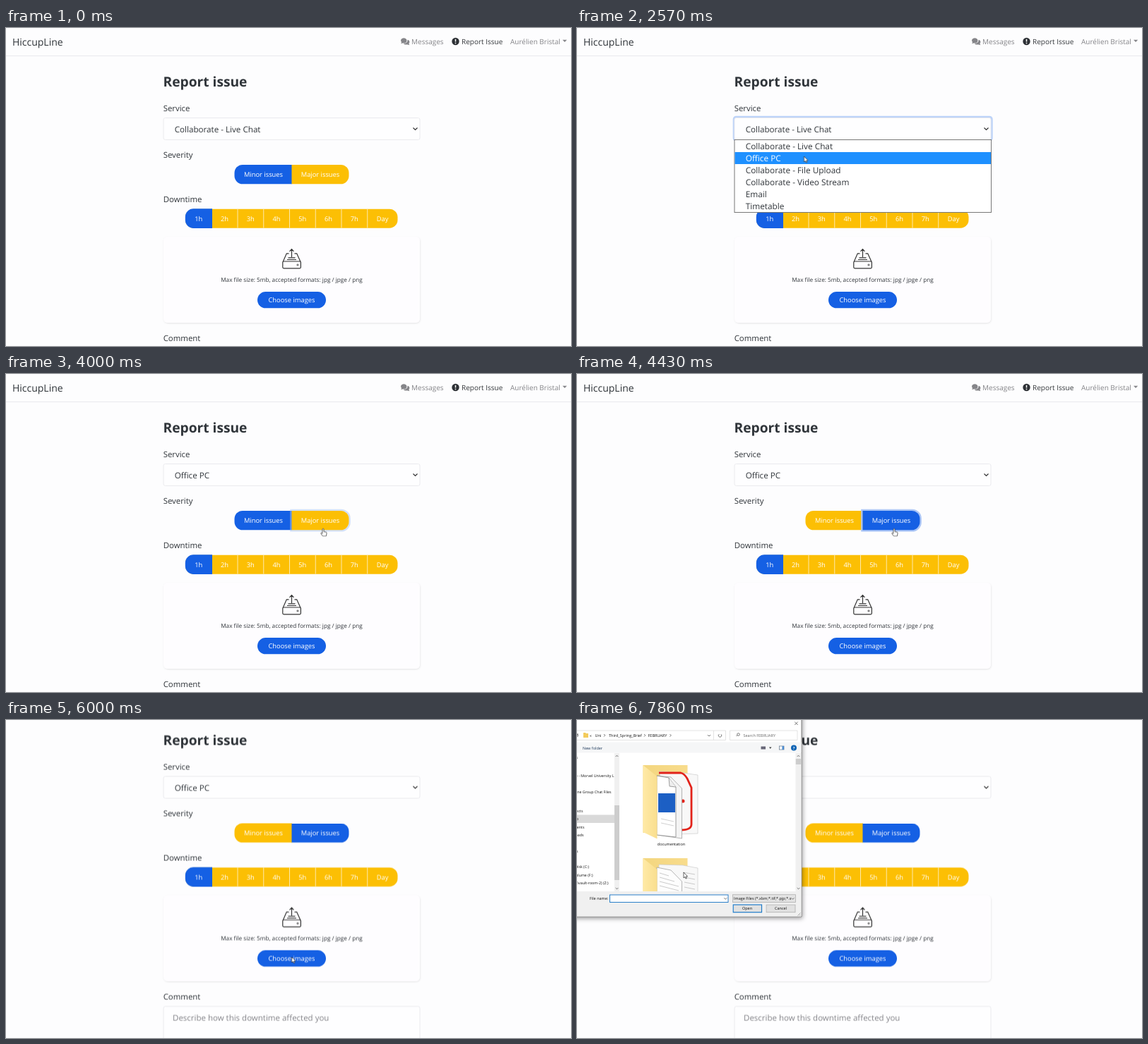
An HTML page that plays this animation: 800 px wide and 451 px high, repeating every 8000 ms.

```html
<!DOCTYPE html>
<html lang="en">
<head>
<meta charset="utf-8">
<title>Report issue</title>
<style>
html, body { margin: 0; width: 100%; height: 100%; overflow: hidden; background: #fdfdfe; }
svg { display: block; width: 100vw; height: 100vh; }
text { font-family: "Open Sans", "Noto Sans", sans-serif; fill: #30353a; text-rendering: geometricPrecision; font-variant-ligatures: none; white-space: pre; }
.label { font-size: 11.4px; }
.value { font-size: 11.65px; }
.option { font-size: 11.8px; }
.hint { font-size: 11.5px; fill: #85858a; }
.nav { font-size: 10px; fill: #858589; }
.btn { font-size: 9.35px; fill: #fff; text-anchor: middle; }
.mid { text-anchor: middle; }
.box { fill: #fefeff; stroke: #eaeaee; }
.line { fill: none; stroke: #333; stroke-width: 1.2; }
.blue { fill: #1560e4; }
.gold { fill: #fcbf04; }
.dialog text { font-size: 5.5px; fill: #111; }
.dialog .side { font-size: 5.3px; text-anchor: end; }
.dialog .line { stroke: #555; stroke-width: .8; }

/* Every part steps through one shared 8 s loop. */
.step { animation: 8s step-end infinite; }
.page { animation-name: scroll; }
.pointer { animation-name: pointer; }
.arrow { animation-name: arrow; }
.hand { animation-name: hand; }
.before { animation-name: before; }
.after { animation-name: after; }
.list { animation-name: list; }
.selectRing { animation-name: selectRing; }
.hot0 { animation-name: hot0; }
.hot1 { animation-name: hot1; }
.word0 { animation-name: word0; }
.word1 { animation-name: word1; }
.minor { animation-name: minor; }
.major { animation-name: major; }
.majorRing { animation-name: majorRing; }
.shell { animation-name: shell; }
.files { animation-name: files; }
.controls { animation-name: controls; }
.caret { animation-name: caret; }

@keyframes scroll {
  0% { transform: none; }
  60.7% { transform: translateY(-14px); }
  62.5% { transform: translateY(-39px); }
  64.2%, 100% { transform: translateY(-47.5px); }
}
@keyframes pointer {
  0% { transform: translate(492px, 264px); opacity: 0; }
  1.75% { transform: translate(490px, 262px); opacity: 1; }
  3.6% { transform: translate(436px, 206px); opacity: 1; }
  7.1% { transform: translate(385px, 168px); }
  10.7% { transform: translate(350px, 150px); }
  12.5% { transform: translate(333px, 146px); }
  21.4% { transform: translate(332px, 150px); }
  23.2% { transform: translate(329px, 158px); }
  25% { transform: translate(326px, 167px); }
  28.6% { transform: translate(323px, 180px); }
  32.1% { transform: translate(321.5px, 182px); }
  41.1% { transform: translate(340px, 187px); }
  42.8% { transform: translate(390px, 202px); }
  44.6% { transform: translate(434px, 215px); }
  46.4% { transform: translate(449px, 219.5px); }
  57.1% { transform: translate(449px, 221px); }
  62.5% { transform: translate(446px, 232px); }
  64.2% { transform: translate(438px, 258px); }
  66.1% { transform: translate(424px, 296px); }
  67.8% { transform: translate(410px, 326px); }
  69.6% { transform: translate(405px, 335px); }
  73.2% { transform: translate(404.5px, 336px); }
  82.1% { transform: translate(370px, 296px); }
  83.8% { transform: translate(232px, 150px); }
  85.7% { transform: translate(168.5px, 84.5px); }
  87.5% { transform: translate(158px, 80px); }
  89.2% { transform: translate(148px, 77px); }
  91.1% { transform: translate(140px, 76px); }
  94.6% { transform: translate(135px, 76px); }
  96.3% { transform: translate(144px, 150px); }
  98.2%, 100% { transform: translate(151px, 216px); opacity: 1; }
}
@keyframes arrow { 0% { opacity: 1; } 46.4% { opacity: 0; } 60.7%, 100% { opacity: 1; } }
@keyframes hand { 0% { opacity: 0; } 46.4% { opacity: 1; } 60.7%, 100% { opacity: 0; } }
@keyframes before { 0% { opacity: 1; } 35.7%, 100% { opacity: 0; } }
@keyframes after { 0% { opacity: 0; } 35.7%, 100% { opacity: 1; } }
@keyframes list { 0% { opacity: 0; } 19.6% { opacity: 1; } 35.7%, 100% { opacity: 0; } }
@keyframes selectRing { 0% { opacity: 0; } 19.6% { opacity: .5; } 21.4% { opacity: 1; } 35.7% { opacity: .6; } 37.5%, 100% { opacity: 0; } }
@keyframes hot0 { 0% { opacity: 1; } 28.6%, 100% { opacity: 0; } }
@keyframes hot1 { 0% { opacity: 0; } 28.6%, 100% { opacity: 1; } }
@keyframes word0 { 0% { fill: #fff; } 28.6%, 100% { fill: #30353a; } }
@keyframes word1 { 0% { fill: #30353a; } 28.6%, 100% { fill: #fff; } }
@keyframes minor { 0% { fill: #1560e4; } 51.7% { fill: #88906f; } 53.6%, 100% { fill: #fcbf04; } }
@keyframes major { 0% { fill: #fcbf04; } 51.7% { fill: #88906f; } 53.6%, 100% { fill: #1560e4; } }
@keyframes majorRing { 0% { opacity: 0; } 50% { opacity: .5; } 51.7% { opacity: 1; } 73.2% { opacity: .4; } 75%, 100% { opacity: 0; } }
@keyframes shell { 0% { opacity: 0; } 82.1%, 100% { opacity: 1; } }
@keyframes files { 0% { opacity: 0; } 83.8%, 100% { opacity: 1; } }
@keyframes controls { 0% { opacity: 0; } 87.5%, 100% { opacity: 1; } }
@keyframes caret { 0% { opacity: 0; } 83.8% { opacity: 1; } 91.1%, 100% { opacity: 0; } }
</style>
</head>
<body>
<svg viewBox="0 0 800 451" preserveAspectRatio="none">
  <defs>
    <filter id="cardShadow" x="-5%" y="-10%" width="110%" height="125%"><feDropShadow dx=".5" dy="1" stdDeviation="1.3" flood-opacity=".1"/></filter>
    <filter id="dialogShadow" x="-5%" y="-5%" width="112%" height="112%"><feDropShadow dx="1" dy="2" stdDeviation="3" flood-opacity=".4"/></filter>
    <linearGradient id="folderBack"><stop stop-color="#f3d67f"/><stop offset="1" stop-color="#f8dc8c"/></linearGradient>
    <linearGradient id="folderFlap"><stop stop-color="#ffeaa6"/><stop offset="1" stop-color="#f9de8e"/></linearGradient>
    <clipPath id="filePane"><path d="M60 47H309V243H60Z"/></clipPath>
  </defs>

  <g class="page step">
    <path d="M0 39.5H800" stroke="#e9e9ed"/>
    <text x="9" y="24.5" font-size="14">HiccupLine</text>
    <g fill="#858589">
      <path d="M559 18c0-5 8.5-5 8.5 0 0 3-3.5 4-5.5 3.3L559.3 22.3 560 20.3Z"/>
      <path d="M568.5 16.8c3 .6 3.7 3.6 1.9 5.2L571.3 24.2 568.5 23.4C566 24 563.7 23.3 563 22 566.5 22 569 20 568.5 16.8Z"/>
      <path d="M788 16.7H794.2L791.1 20Z"/>
    </g>
    <text class="nav" x="574" y="22.7">Messages</text>
    <circle cx="636.5" cy="19" r="5.2" fill="#2d3035"/>
    <path d="M636.5 15.8V19.5M636.5 20.8V22.2" stroke="#fff" stroke-width="1.5"/>
    <text class="nav" x="645" y="22.7" style="fill:#35383c">Report Issue</text>
    <text class="nav" x="714" y="22.7">Aurélien Bristal</text>

    <text x="222.5" y="82.7" font-size="19.2" font-weight="700">Report issue</text>

    <text class="label" x="222.7" y="117.7">Service</text>
    <rect class="selectRing step" x="222.2" y="126.3" width="365" height="33" rx="3" fill="none" stroke="#bdd3f8" stroke-width="3"/>
    <rect class="box" x="223" y="127.5" width="363" height="31" rx="2.5"/>
    <text class="value before step" x="238.7" y="148">Collaborate - Live Chat</text>
    <text class="value after step" x="238.7" y="148">Office PC</text>
    <path class="line" d="M576.5 141.5L579.5 144.5 582.5 141.5"/>

    <text class="label" x="222.7" y="184.3">Severity</text>
    <path class="minor step" d="M405 194V221.3H335A11.5 11.5 0 0 1 323.5 209.8V205.5A11.5 11.5 0 0 1 335 194Z"/>
    <path class="majorRing step" d="M403.5 193H474.5A12 12 0 0 1 486.5 205V210.3A12 12 0 0 1 474.5 222.3H403.5Z" fill="none" stroke="#aac5f6" stroke-width="2.6"/>
    <path class="major step" d="M404.5 194H474A11.5 11.5 0 0 1 485.5 205.5V209.8A11.5 11.5 0 0 1 474 221.3H404.5Z"/>
    <text class="btn" x="364.5" y="211.2">Minor issues</text>
    <text class="btn" x="445" y="211.2">Major issues</text>

    <text class="label" x="222.7" y="247">Downtime</text>
    <rect class="gold" x="254" y="256.7" width="300.5" height="27" rx="11.5"/>
    <path class="blue" d="M292 256.3V284H265.5A11.7 11.7 0 0 1 253.8 272.3V268A11.7 11.7 0 0 1 265.5 256.3Z"/>
    <g id="hours"></g>

    <rect x="223" y="296" width="363" height="122" rx="6" fill="#fefdff" filter="url(#cardShadow)"/>
    <g class="line">
      <rect x="391.8" y="331" width="25.6" height="9.8" rx="1.5"/>
      <path d="M392.2 331.5L397.3 319.8H400.5M408.5 319.8H411.7L417 331.5M404.5 325V314M401.5 316.8L404.5 313.7 407.5 316.8M399.5 325.8H409.5M398 328.5H411"/>
      <circle cx="413" cy="336" r="1.1" stroke-width=".8"/>
    </g>
    <text class="mid" x="404.5" y="360.2" font-size="8.23">Max file size: 5mb, accepted formats: jpg / jpge / png</text>
    <rect class="blue" x="356" y="374" width="97" height="23.3" rx="11.6"/>
    <text class="btn" x="404.5" y="389.2">Choose images</text>

    <text class="label" x="222.7" y="443.7">Comment</text>
    <rect class="box" x="223" y="453.7" width="363" height="120" rx="2.5"/>
    <text class="hint" x="236" y="474">Describe how this downtime affected you</text>

    <g class="list step">
      <rect x="223" y="158.5" width="363.5" height="103" fill="#fff" stroke="#777"/>
      <g id="options"></g>
    </g>
  </g>

  <g class="dialog shell step">
    <path d="M-20-20H318V279H-20Z" fill="#fff" stroke="#777" filter="url(#dialogShadow)"/>
    <path d="M0 31.5H317.5V46.5H0Z" fill="#f5f6f7"/>
    <path d="M0 243H317.5V278.5H0Z" fill="#f0f0f0"/>
    <path class="line" d="M308.3 2.6L312.7 7M312.7 2.6L308.3 7"/>
    <rect x="286.5" y="37" width="6.5" height="5" fill="#fff" stroke="#5b6f86" stroke-width=".7"/>
    <path d="M290.5 37H293V42H290.5Z" fill="#4b8bd0"/>
    <circle cx="307" cy="39.5" r="4" fill="#0f64b4"/>
    <text class="mid" x="307" y="41.5" style="fill:#fff;font-weight:700">?</text>
    <path d="M220 247H310V258.5H220ZM220 261H262V273H220ZM267 261H309V273H267Z" fill="#fdfdfd"/>
    <text x="18" y="255">File name:</text>
    <rect x="46.5" y="248" width="167.5" height="10.5" fill="#fff" stroke="#2a7fc9"/>
    <path class="line" d="M208.3 252.3L210.3 254.3 212.3 252.3"/>
    <path class="caret step" d="M48.5 249.5V257" stroke="#222" stroke-width=".8"/>

    <g class="files step">
      <path d="M0 134.5H53V146H0Z" fill="#d9d9d9"/>
      <g id="places"></g>
      <path d="M53 47H60V243H53ZM309.5 47H317.5V243H309.5Z" fill="#f0f0f0"/>
      <path d="M53 121H60V227H53ZM309.8 55H317.3V63H309.8Z" fill="#cdcdcd"/>
      <path class="line" d="M54.7 52L56.5 50.2 58.3 52M54.7 238L56.5 239.8 58.3 238M311.7 52L313.5 50.2 315.3 52M311.7 238L313.5 239.8 315.3 238"/>
      <g clip-path="url(#filePane)" stroke-width=".7">
        <path d="M93.5 64H156.5V160H93.5Z" fill="url(#folderBack)"/>
        <path d="M116 73L150 75 171 78V161L140 162Z" fill="#f8f8f8" stroke="#ccc"/>
        <path d="M116 75H147Q152 76 156 83L162 96V148Q162 156 147 156" fill="none" stroke="#e2231a" stroke-width="2.8"/>
        <circle cx="150" cy="115" r="2.5" fill="#e2231a"/>
        <path d="M113 79L133 81 148.5 97V168L113 163Z" fill="#f4f4f4" stroke="#999"/>
        <path d="M113 79L130 82 140 95V166L113 163Z" fill="#fff" stroke="#777"/>
        <path d="M130 82L131 94 140 95" fill="#eee" stroke="#777"/>
        <path d="M119 140L137 144M119 146L137 150" stroke="#bbb"/>
        <rect x="115" y="104" width="24" height="27" fill="#1c5fc4"/>
        <path d="M93.5 64L113.5 80V168.5L93.5 159Z" fill="url(#folderFlap)"/>
        <text class="mid" x="133.5" y="178">documentation</text>

        <path d="M93.5 196H156.5V300H93.5Z" fill="url(#folderBack)"/>
        <path d="M116 205L150 206 171 210V290H116Z" fill="#f8f8f8" stroke="#ccc"/>
        <path d="M113 209L133 213 148.5 229V290H113Z" fill="#fdfdfd" stroke="#999"/>
        <path d="M117 217L130 221M117 223L138 229M117 229L144 236M117 235L144 242M150 216L167 219M152 223L167 226M152 230L167 233M152 237L167 240" stroke="#b5b5b5"/>
        <path d="M93.5 196L113.5 212V300H93.5Z" fill="url(#folderFlap)"/>
      </g>
    </g>

    <g class="controls step">
      <path d="M-5 15H210.5V28.5H-5ZM193.5 15V28.5M216.5 15H312V28.5H216.5Z" fill="#fff" stroke="#dcdcdc" stroke-width=".8"/>
      <path class="line" d="M0 20L2 22M1 19V24M185 21L187 23 189 21M95 20L96.8 21.8 95 23.6M38 20L39.8 21.8 38 23.6M131.5 20L133.3 21.8 131.5 23.6M204 20.3A2.2 2.2 0 1 1 201.5 20M225.5 23L227 21.5"/>
      <circle class="line" cx="228.5" cy="20.5" r="1.8"/>
      <path d="M9 18H12L13 19H16V25H9Z" fill="#f3cb5c"/>
      <text x="18" y="23.8">«</text>
      <text x="25.5" y="23.8">Uni</text>
      <text x="45" y="23.8">Third_Spring_Brief</text>
      <text x="100.5" y="23.8">FEBRUARY</text>
      <text x="235.5" y="23.8" style="fill:#666">Search FEBRUARY</text>
      <text x="8" y="41.5" style="fill:#1e395b">New folder</text>
      <path d="M260.5 37.5H267V41.5H260.5Z" fill="#667"/>
      <path d="M272 38.5H275.5L273.7 40.8Z" fill="#333"/>
      <rect x="220.5" y="247.7" width="89" height="10.8" fill="#e3e3e3" stroke="#adadad" stroke-width=".8"/>
      <text x="222" y="255">Image Files (*.xbm;*.tif;*.pjp;*.s</text>
      <path class="line" d="M303.5 252.3L305.5 254.3 307.5 252.3"/>
      <rect x="221.2" y="262" width="40.3" height="10.7" fill="#e1e1e1" stroke="#1f7bc8" stroke-width="1.2"/>
      <rect x="268" y="262" width="41" height="10.7" fill="#e1e1e1" stroke="#adadad" stroke-width=".8"/>
      <text class="mid" x="241" y="269.2">Open</text>
      <text class="mid" x="288.5" y="269.2">Cancel</text>
      <path d="M312.5 277.5L316.5 273.5M315 277.5L316.5 276" stroke="#aaa"/>
    </g>
  </g>

  <g class="pointer step" stroke="#333" stroke-width=".75" stroke-linejoin="round" fill="#fff">
    <path class="arrow step" d="M0 0V8L1.8 6.4 3 9.1 4.3 8.5 3.2 5.9H5.6Z"/>
    <path class="hand step" d="M-1 .8A1 1 0 0 1 1 .8V4L4 4.7Q5.3 5.1 5.1 6.4L4.3 10.5H-.5L-3.2 6.6Q-3 5.4-2 5.8L-1 6.8Z"/>
  </g>
</svg>
<script>
const fillGroup = (id, items, draw) => {
  document.getElementById(id).innerHTML = items.map(draw).join("");
};

fillGroup("hours", ["1h", "2h", "3h", "4h", "5h", "6h", "7h", "Day"], (name, i) => {
  const left = 254.5 + 36.75 * i;
  const center = name === "Day" ? 533 : left + 18.3;
  const divider = i > 1 ? `<path d="M${left} 257V283.5" stroke="#fff" stroke-opacity=".75" stroke-width=".9"/>` : "";
  return `${divider}<text class="btn" x="${center}" y="273.8">${name}</text>`;
});

fillGroup("options", ["Collaborate - Live Chat", "Office PC", "Collaborate - File Upload",
  "Collaborate - Video Stream", "Email", "Timetable"], (name, i) => {
  const top = 158.9 + 17.1 * i;
  const bar = i < 2 ? `<rect class="hot${i} step" x="223.5" y="${top}" width="362.5" height="17" fill="#1e90ff"/>` : "";
  return `${bar}<text class="option ${i < 2 ? `word${i} step` : ""}" x="238.7" y="${top + 13}">${name}</text>`;
});

fillGroup("places", [
  ["s", 1, 55], ["e - Morvel University L", 52.5, 80.7], ["lane Group Chat Files", 48.5, 103.7],
  ["Objects", 8.5, 130.5], ["Desktop", 2, 142], ["Documents", 10.5, 153.5], ["Downloads", 9.5, 164.7],
  ["Videos", 1.5, 187.5], ["Disk (C:)", 17, 210.3], ["Volume (F:)", 22.5, 221.7],
  ["\\vault-room-2) (Z:)", 44.5, 233]
], ([name, right, y]) => `<text class="side" x="${right}" y="${y}">${name}</text>`);
</script>
</body>
</html>
```
